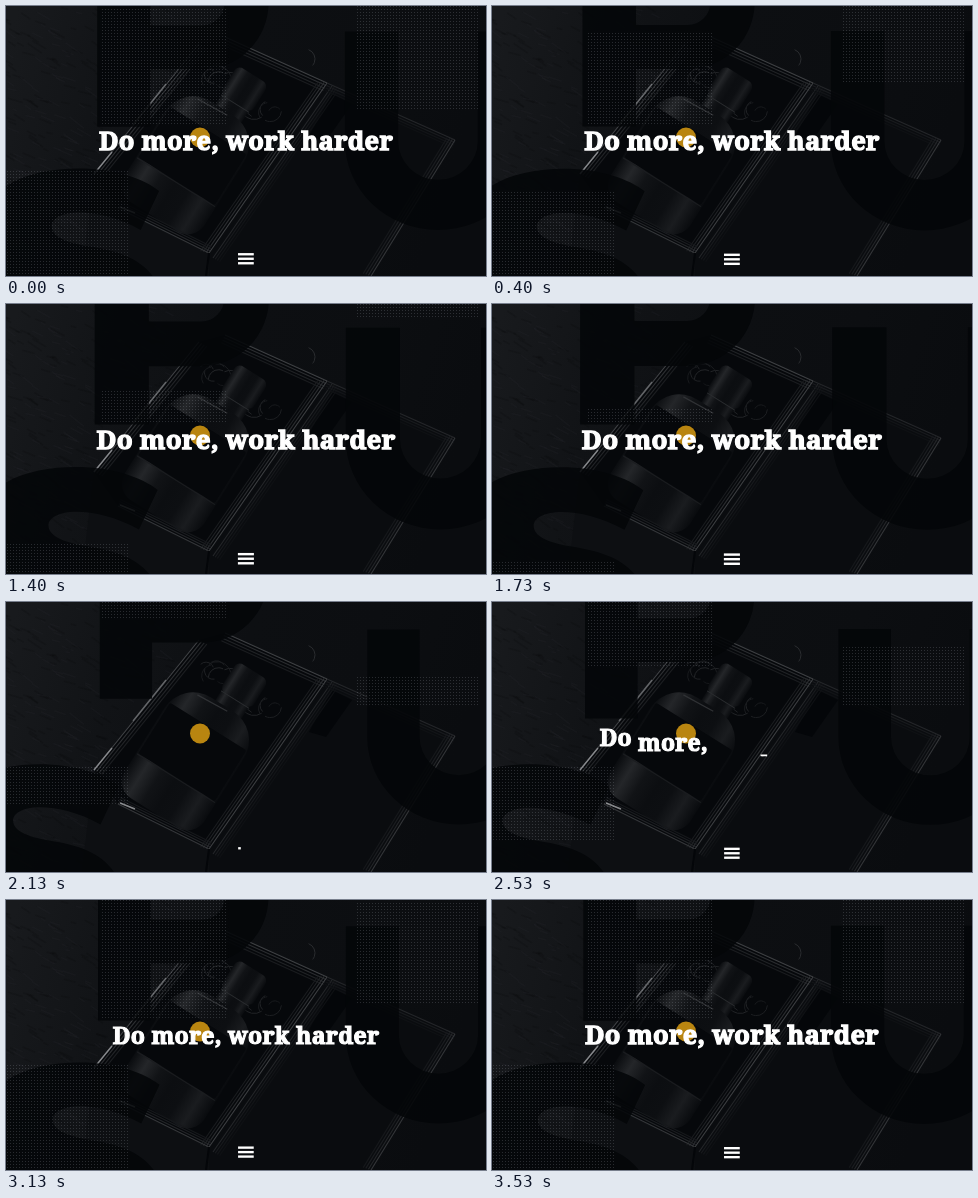
Write an HTML page with a canvas that moves like this. It is 480 px wide and 270 px high and loops after 3.59 s.

```html
<!DOCTYPE html>
<html lang="en">
<head>
<meta charset="utf-8">
<title>Do more, work harder</title>
<style>
html, body { margin: 0; width: 100%; height: 100%; overflow: hidden; background: #0b0c0e; }
canvas { display: block; width: 100vw; height: 100vh; }
</style>
</head>
<body>
<canvas id="stage" width="480" height="270"></canvas>
<script>
const W = 480, H = 270, LOOP = 3590, CUT = 1735;
const ctx = document.getElementById('stage').getContext('2d');
const clamp = v => Math.min(1, Math.max(0, v));
const smooth = p => p * p * (3 - 2 * p);
const outQuart = p => 1 - (1 - p) ** 4;
const progress = (age, delay, duration) => clamp((age - delay) / duration);
const grey = (level, alpha = 1) => `rgba(${level},${level + 2},${level + 5},${alpha})`;

function seeded(seed) {
  return () => (seed = (seed * 16807) % 2147483647) / 2147483647;
}

function poly(c, points, fill) {
  c.beginPath();
  points.forEach(p => c.lineTo(...p));
  c.closePath();
  c.fillStyle = fill;
  c.fill();
}

function line(c, from, to, color, width = 1) {
  c.beginPath();
  c.moveTo(...from);
  c.lineTo(...to);
  c.strokeStyle = color;
  c.lineWidth = width;
  c.stroke();
}

// Parallel strips of a box wall, fading inwards.
function rails(c, from, to, dx, dy, light) {
  for (let i = 0; i < 4; i++) {
    const shift = ([x, y]) => [x + dx * i, y + dy * i];
    line(c, shift(from), shift(to), grey(Math.round(light / (1 + i * 0.45))), 1.1);
  }
}

function roundBox(c, x, y, w, h, r, fill) {
  c.beginPath();
  c.roundRect(x, y, w, h, r);
  c.fillStyle = fill;
  c.fill();
}

// Dark glass: bright rim on the left, faint rim on the right.
function glass(c, left, width) {
  const g = c.createLinearGradient(left, 0, left + width, 0);
  [10, 36, 17, 12, 13, 26, 9].forEach((level, i) => g.addColorStop(i / 6, grey(level)));
  return g;
}

function drawBottle(c) {
  c.save();
  c.translate(232, 77);
  c.rotate(Math.PI * 0.178);
  roundBox(c, -8, 8, 32, 36, 3, glass(c, -8, 32));
  roundBox(c, -47, 30, 94, 128, [34, 34, 20, 20], glass(c, -47, 94));
  roundBox(c, -45, 56, 90, 60, 2, grey(6));
  line(c, [-46, 117], [46, 117], grey(27));
  line(c, [-26, 35], [8, 33], grey(48), 1.2);
  roundBox(c, -10, -15, 37, 34, 7, glass(c, -10, 37));
  line(c, [-8, 19], [25, 19], grey(42));
  c.restore();
  c.beginPath();
  c.arc(194, 131.5, 10, 0, Math.PI * 2);
  c.fillStyle = '#b98510';
  c.fill();
}

function drawStone(c) {
  const g = c.createLinearGradient(0, 40, 440, 180);
  [24, 17, 13, 12, 10].forEach((level, i) => g.addColorStop(i / 4, grey(level)));
  c.fillStyle = g;
  c.fillRect(0, 0, W, H);
  const random = seeded(17);
  for (let i = 0; i < 420; i++) {
    const x = random() * 170 - 10, y = random() * H, len = 4 + random() * 11;
    const level = random() < 0.5 ? 50 : 4;
    line(c, [x, y], [x + len, y + len * (0.2 + random() * 0.6)], grey(level, 0.14), 1.5);
  }
}

function drawStraw(c) {
  const random = seeded(5);
  c.lineWidth = 1;
  for (let i = 0; i < 22; i++) {
    const p = random(), turn = random() * 6;
    c.beginPath();
    c.arc(200 + p * 75, 60 + p * 50 + random() * 10, 5 + random() * 9, turn, turn + 2);
    c.strokeStyle = grey(20 + Math.round(random() * 16));
    c.stroke();
  }
}

function makePhoto() {
  const canvas = document.createElement('canvas');
  canvas.width = W;
  canvas.height = H;
  const c = canvas.getContext('2d');
  const left = [88, 168], top = [193, 38], rim = [219, 31], hinge = [321, 77];
  const front = [112, 202], bottom = [203, 247], lidRight = [449, 134], lidBottom = [365, 270];
  drawStone(c);
  poly(c, [left, top, rim, hinge, bottom, front], grey(6));
  poly(c, [left, front, bottom, [201, H], [76, H]], grey(13));
  poly(c, [hinge, lidRight, lidBottom, [203, H], bottom], grey(10));
  poly(c, [[326, 88], [346, 98], [320, 135], [303, 130]], grey(4));
  drawStraw(c);
  drawBottle(c);
  rails(c, left, top, 2.6, 1.4, 66);
  rails(c, rim, hinge, -1.2, 2.6, 62);
  rails(c, hinge, bottom, -2.8, -0.6, 62);
  rails(c, [326, 80], [207, 252], 2.2, 1.2, 36);
  rails(c, hinge, lidRight, -0.6, 2.5, 36);
  rails(c, lidRight, lidBottom, -2.6, -0.8, 52);
  rails(c, front, bottom, 0.8, -2.2, 52);
  line(c, bottom, [200, H], grey(4), 2);
  line(c, left, [106, 146], grey(135), 1.4);
  line(c, [127, 119], [160, 78], grey(100), 1.3);
  line(c, [114, 201], [129, 207], grey(135), 1.5);
  c.beginPath();
  c.arc(299, 53, 10, -1.2, 0.7);
  c.strokeStyle = grey(42);
  c.lineWidth = 1;
  c.stroke();
  return canvas;
}

const letterP = new Path2D(
  'M94.5 -140V121H146.5V65H197A65 65 0 0 0 197 -65V-140Z' +
  'M146.5 22V-22H197A22 22 0 0 1 197 22Z');
const letterU = new Path2D(
  'M336 28H388V135A39 38 0 0 0 466 135V28H518V135A91 87 0 0 1 336 135Z');
const letterS = new Path2D(
  'M-14 200C0 172 40 162 76 162C112 162 140 172 155 184L137 222' +
  'C115 210 94 205 77 205C60 205 50 211 50 218C50 228 63 234 86 238' +
  'C116 243 140 250 154 275H-20Z');

function drawLetter(path, dx, dy) {
  ctx.save();
  ctx.translate(dx, dy);
  ctx.fillStyle = grey(4, 0.88);
  ctx.fill(path, 'evenodd');
  ctx.restore();
}

function drawLetters(age) {
  const slide = smooth(progress(age, 1065, 330));
  drawLetter(letterP, 0, -130 * Math.exp(-age / 235));
  drawLetter(letterU, 64 * Math.exp(-age / 416), 0);
  drawLetter(letterS, 37 * (slide - 1) - 130 * Math.exp(-age / 120), 0);
}

// A dotted panel wiped in and later wiped out in the same direction.
function drawDots(x0, x1, from, to, shown, hidden) {
  const start = from + (to - from) * hidden, end = from + (to - from) * shown;
  const low = Math.min(start, end), high = Math.max(start, end);
  ctx.fillStyle = 'rgba(200,206,214,0.18)';
  for (let y = Math.ceil(low / 3) * 3; y < high; y += 3)
    for (let x = x0; x < x1; x += 3) ctx.fillRect(x, y, 1, 1);
}

function drawPattern(age) {
  drawDots(96, 222, 0, 118, progress(age, 250, 1000), progress(age, 1855, 1950));
  drawDots(351, 474, 104, 0, progress(age, 0, 1400), progress(age, 1855, 1600));
  drawDots(1, 122, 164, 268, progress(age, 0, 1100), progress(age, 1855, 1950));
}

function drawTitle(age) {
  const words = ['Do', 'more,', 'work', 'harder'];
  const scale = 0.911 + 0.089 * smooth(progress(age, 1395, 390));
  ctx.save();
  ctx.translate(240, 135);
  ctx.scale(scale, scale);
  ctx.beginPath();
  ctx.rect(-170, -40, 340, 61);
  ctx.clip();
  ctx.font = '700 25px "Noto Serif", serif';
  ctx.letterSpacing = '0.25px';
  ctx.fillStyle = ctx.strokeStyle = '#fff';
  ctx.lineWidth = 1.3;
  ctx.lineJoin = 'miter';
  ctx.miterLimit = 3;
  const space = ctx.measureText(' ').width;
  let x = -ctx.measureText(words.join(' ')).width / 2;
  words.forEach((word, i) => {
    const y = 9.2 + 50 * (1 - outQuart(progress(age, 435 + i * 150, 500)));
    ctx.fillText(word, x, y);
    ctx.strokeText(word, x, y);
    x += ctx.measureText(word).width + space;
  });
  ctx.restore();
}

function drawMenu(age) {
  ctx.fillStyle = '#fff';
  for (let i = 0; i < 3; i++) {
    const grow = outQuart(progress(age, 380 + i * 70, 350));
    ctx.fillRect(232.2, 244.6 + i * 4.4, 15.4 * grow, 2.3);
  }
}

function zoomed(age, paint) {
  const zoom = 1 + 0.0000122 * age;
  ctx.save();
  ctx.translate(W / 2, H / 2);
  ctx.scale(zoom, zoom);
  ctx.translate(-W / 2, -H / 2);
  paint(age);
  ctx.restore();
}

const photo = makePhoto();

function draw(time) {
  const age = (time + LOOP - CUT) % LOOP;
  ctx.drawImage(photo, 0, 0);
  zoomed(age, drawLetters);
  drawPattern(age);
  zoomed(age, drawTitle);
  zoomed(age, drawMenu);
}

const start = performance.now();
function frame() {
  draw((performance.now() - start) % LOOP);
  requestAnimationFrame(frame);
}
frame();
</script>
</body>
</html>
```
